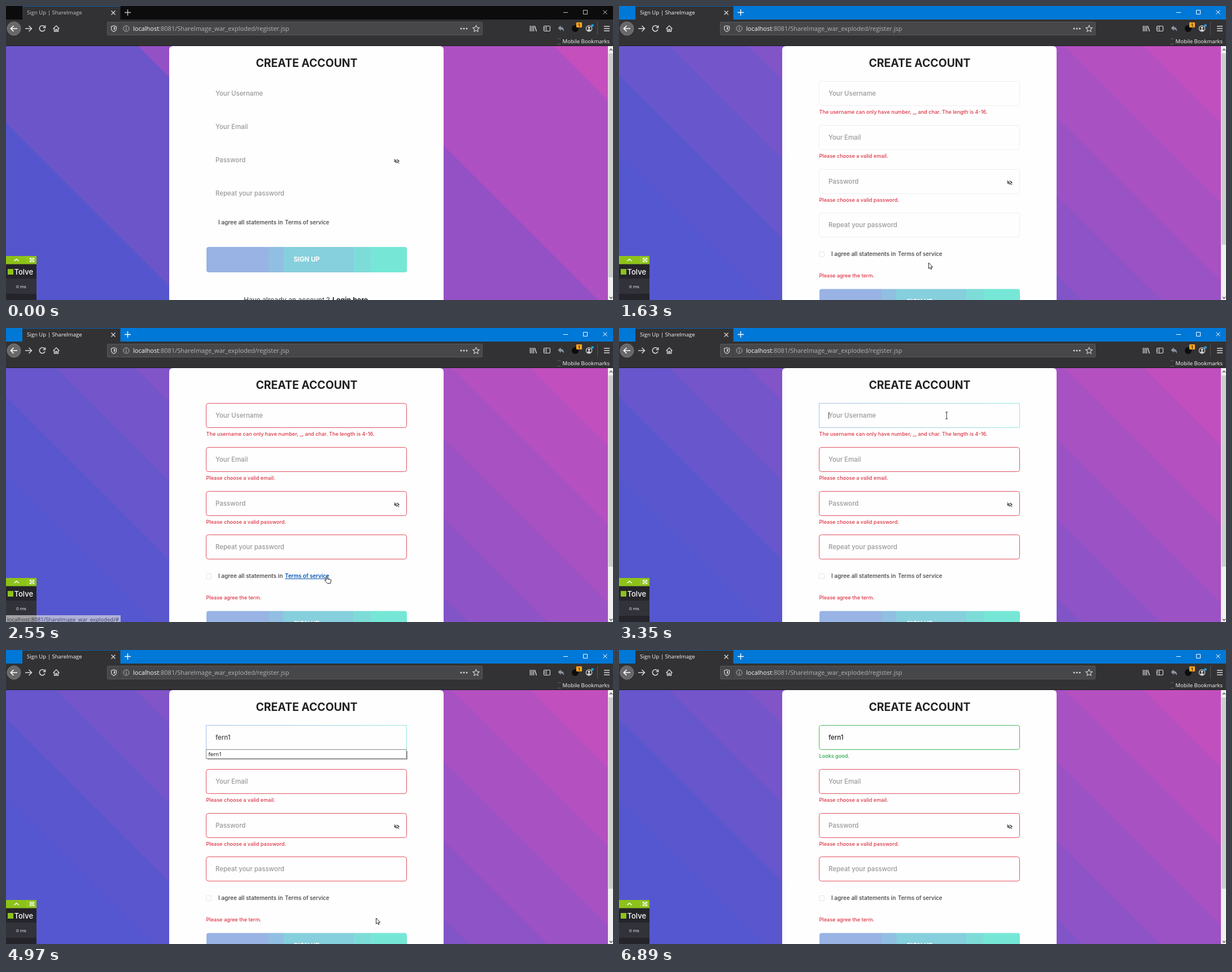
An HTML page for the animation above (6.99 s loop, 1075 by 521 pixels).

```html
<!DOCTYPE html>
<html lang="en">
<head>
<meta charset="utf-8">
<title>Sign Up</title>
<style>
html, body { margin: 0; width: 100%; height: 100%; overflow: hidden; background: #323234; }
svg { display: block; width: 1075px; height: 521px; }
text { white-space: pre; }
.form { font-family: Inter, "Noto Sans", sans-serif; }
.ui { font-family: "Open Sans", "Noto Sans", sans-serif; }
</style>
</head>
<body>
<svg id="stage" viewBox="0 0 1075 521" xmlns="http://www.w3.org/2000/svg"></svg>
<script>
const LOOP = 6990;
const RED = [220, 53, 69], GREEN = [40, 167, 69], PALE = [235, 235, 235];
const BLUE = [84, 87, 207], VIOLET = [142, 83, 198], PINK = [199, 79, 189];
const LEFT = 354.5, WIDTH = 355;
const FIELD_Y = [133.5, 211.5, 289.5, 366.5];
const LABELS = ["Your Username", "Your Email", "Password", "Repeat your password"];
const NAME = "fern1";
const KEY_TIMES = [3650, 3800, 4050, 4300, 4500];

const ramp = (t, a, b) => Math.min(1, Math.max(0, (t - a) / (b - a)));
const mix = (a, b, k) => `rgb(${a.map((v, i) => Math.round(v + (b[i] - v) * k))})`;

const rect = (x, y, w, h, fill, more = "") =>
  `<rect x="${x}" y="${y}" width="${w}" height="${h}" fill="${fill}" ${more}/>`;
const line = (d, color, w = 1, more = "") =>
  `<path d="${d}" fill="none" stroke="${color}" stroke-width="${w}" ${more}/>`;
const label = (cls, x, y, s, size, fill, weight = 400, more = "") =>
  `<text class="${cls}" x="${x}" y="${y}" font-size="${size}" fill="${fill}" font-weight="${weight}" ${more}>${s}</text>`;
const form = (...a) => label("form", ...a);
const ui = (...a) => label("ui", ...a);
const group = (id, body, more = "") => `<g id="${id}" ${more}>${body}</g>`;

function defs() {
  const bands = [[355, 465, "#98b3e4"], [465, 491, "#90bfe1"], [491, 615, "#86cfdc"],
    [615, 646, "#7edcd8"], [646, 710, "#76e7d6"]];
  const stops = bands.map(([a, b, c]) =>
    [a, b].map(x => `<stop offset="${(x - 355) / 355}" stop-color="${c}"/>`).join("")).join("");
  return `<defs>
    <linearGradient id="bands" gradientUnits="userSpaceOnUse" x1="355" y1="0" x2="710" y2="0">${stops}</linearGradient>
    <linearGradient id="focusLine" gradientUnits="userSpaceOnUse" x1="355" y1="0" x2="710" y2="0">
      <stop offset="0" stop-color="#97b3e4"/><stop offset="1" stop-color="#84e3d8"/></linearGradient>
    <clipPath id="page"><rect y="71" width="1066" height="450"/></clipPath>
  </defs>`;
}

// Everything to the upper right of the diagonal x - y = s.
const beyond = (s, color) => `<path d="M${s + 71} 71L${s + 521} 521H1600V71z" fill="${color}"/>`;

function coarseBack() {
  const bands = [[-207, "#6c55c9"], [163, "#9451c5"], [528, "#ad50c2"], [899, "#c44fbd"]];
  return rect(0, 71, 1066, 450, "#5556cd") + bands.map(b => beyond(...b)).join("");
}

function fineBack() {
  const start = -262, step = 140, count = 9;
  let out = rect(0, 71, 1066, 450, mix(BLUE, BLUE, 0));
  for (let i = 0; i < count; i++) {
    const k = (i + .5) / count * 2;
    out += beyond(start + i * step, k < 1 ? mix(BLUE, VIOLET, k) : mix(VIOLET, PINK, k - 1));
  }
  return out;
}

const card = `<path d="M289 521V78q0-7 7-7H768q7 0 7 7V521z" fill="#fefefe"/>` +
  form(532.5, 108, "CREATE ACCOUNT", 19.4, "#222", 700, 'text-anchor="middle"');

const eye = y => `<g transform="translate(692 ${y})">
  <path d="M-5 0Q0-6.4 5 0Q0 6.4-5 0z" fill="#444"/><circle r="2.1" fill="#fefefe"/><circle r="1.2" fill="#444"/>
  ${line("M-4.2-4.2L4.6 4", "#fefefe", 2.2)}${line("M-4.6-3.6L4.2 4.2", "#444", 1.1)}</g>`;

const button = y => rect(355, y, 355, 45, "url(#bands)", 'rx="4"') +
  form(532.5, y + 26, "SIGN UP", 11.4, "#fff", 700, 'text-anchor="middle"');

const terms = y => form(376, y, "I agree all statements in", 10, "#555", 600) +
  form(494, y, "Terms of service", 9.7, "#555", 600);

function firstPage() {
  return coarseBack() + card +
    LABELS.map((s, i) => form(371, 159 + i * 59.1, s, 11.4, "#999", 500)).join("") +
    eye(275) + terms(387) + button(427) +
    form(421, 525, "Have already an account ?", 12.1, "#555", 500) +
    form(578, 525, "Login here", 12.3, "#222", 700);
}

function secondPage() {
  const note = (y, s) => form(354.5, y, s, 9.1, "#dc3545", 500);
  return fineBack() + card +
    FIELD_Y.map((y, i) => rect(LEFT, y, WIDTH, 43, "#fefefe", `class="field" rx="4" stroke-width=".85"`) +
      form(371, y + 25.5, LABELS[i], 11.4, "#999", 500, `id="hint${i}"`)).join("") +
    eye(313) +
    form(354.5, 190.5, "", 9.1, "#dc3545", 500, 'id="nameNote"') +
    note(268.5, "Please choose a valid email.") +
    note(346.5, "Please choose a valid password.") +
    note(481, "Please agree the term.") +
    rect(354.5, 435.5, 9, 9, "#fefefe", 'rx="1.5" stroke="#e6e6e6"') +
    terms(443) +
    group("link", rect(493, 433, 80, 13, "#fefefe") +
      form(494, 443, "Terms of service", 9.7, "#0056b3", 600, 'text-decoration="underline"')) +
    button(501.5) +
    form(371, 159, "", 11.4, "#444", 500, 'id="typed"') +
    line("M0 149V161", "#444", 1, 'id="caret"') +
    group("menu", rect(357, 179, 354, 15, "#999") +
      rect(354.5, 176.5, 354.5, 16, "#fff", 'stroke="#888"') + ui(358.5, 188, NAME, 9.6, "#000", 500));
}

function chrome() {
  const ink = "#d8d8da";
  const tab = rect(29, 0, 173.5, 25, "#323234") + rect(29, 0, 173.5, 1, "#0a64b4") +
    ui(37, 15, "Sign Up | ShareImage", 9.6, "#ddd", 400, 'id="tabName"') +
    line("M186.5 8.5l7 7m0-7l-7 7", "#ddd", 1.2);
  const controls = group("controls", line("M210 11.5h11m-5.5-5.5v11", "#fff", 1.4) +
    line("M987 11.5h8M1022.5 7.5h7v7h-7zM1057.5 7.5l7 7m0-7l-7 7", "#fff", 1));
  const nav = `<circle cx="14" cy="40" r="12" fill="#68686b" stroke="#858588" stroke-width=".8"/>` +
    line("M20 40H8.5m5-5l-5 5l5 5", "#fff", 1.7) +
    line("M34 40h11.5m-5-5l5 5l-5 5", ink, 1.5) +
    line("M68.5 37a5 5 0 1 0 .5 4.5M69.5 34.5v4h-4", ink, 1.6) +
    line("M83.5 40.5l5.5-5.5l5.5 5.5M85.5 39.5v5.5h2.5v-3.5h2v3.5h2.5v-5.5", ink, 1.4);
  const bar = rect(179.5, 28.5, 664, 23, "#474749", 'rx="1" stroke="#59595c"') +
    rect(201, 29, 1, 22, "#3d3d40") +
    line("M191 35l4.5 1.5v3q0 4-4.5 6q-4.5-2-4.5-6v-3z", ink, 1.2) +
    `<path d="M191 37v6q2.5-1.5 2.5-5z" fill="${ink}"/>` +
    `<circle cx="213" cy="40" r="5" fill="none" stroke="#b5b5b7"/>` +
    line("M213 37v1.5m0 1v3.5", "#b5b5b7", 1.2) +
    ui(225, 44, `<tspan fill="#f9f9fa">localhost</tspan>:8081/ShareImage_war_exploded/register.jsp`, 11, "#b4b4b6") +
    [806, 811, 816].map(x => `<circle cx="${x}" cy="40" r="1.5" fill="${ink}"/>`).join("") +
    line("M832.5 34.5l1.7 3.6l4 .5l-3 2.7l.8 3.9l-3.5-1.9l-3.5 1.9l.8-3.9l-3-2.7l4-.5z", ink, 1.1);
  const tools = line("M928.5 35v10M931.5 35v10M934.5 35v10M936.5 35.5l3 9.5", ink, 1.4) +
    rect(952.5, 35.5, 11, 9, "none", `rx="1.5" stroke="${ink}" stroke-width="1.2"`) +
    line("M957 36v8.5M953.5 38.5h2m-2 2.5h2", ink) +
    `<path d="M977.5 39l5-4.5v2.8q6 0 5.5 8q-1.5-4-5.5-4v2.7z" fill="#8c96a3"/>` +
    `<circle cx="1008" cy="40" r="6" fill="#0c0c0d"/>` +
    rect(1010, 29, 10, 9, "#ffa51f", 'rx="1"') +
    ui(1015, 36.7, "1", 8, "#111", 600, 'text-anchor="middle"') +
    `<circle cx="1032.5" cy="40" r="5.2" fill="none" stroke="${ink}" stroke-width="1.2"/>
     <circle cx="1032.5" cy="38.5" r="2" fill="${ink}"/><path d="M1029 43q3.5-4 7 0q-3.5 3-7 0z" fill="${ink}"/>
     <circle cx="1038.5" cy="34.5" r="2.3" fill="#19a7f0"/>` +
    rect(1047, 28, 1, 23, "#55565a") +
    line("M1059 36h10m-10 4h10m-10 4h10", ink, 1.5) +
    line("M977 58h6M977 67.5h6", "#77777a", 1, 'stroke-dasharray="2 1"') +
    ui(985.5, 65.7, "Mobile Bookmarks", 9.6, "#f9f9fa");
  return rect(0, 0, 1075, 25, "#0078d7", 'id="titleBar"') + rect(0, 24, 1075, 47, "#323234") +
    tab + controls + nav + bar + tools + rect(0, 70, 1075, 1, "#1c1c1e");
}

const scrollBar = rect(1066, 71, 9, 450, "#f0f0f0") +
  rect(1067, 84, 8, 340, "#cdcdcd", 'id="thumb"') +
  line("M1069 79l2.5-3l2.5 3M1069 515.5l2.5 3l2.5-3", "#555", 1.3);

const badge = rect(0, 443, 54, 15, "#8dc21a") + rect(37.5, 443, 1, 15, "#a4d043") +
  line("M14.5 452l4-3.5l4 3.5", "#fff", 1.6) +
  line("M42.5 446.5l7 7m0-7l-7 7M42.5 449.5v-3h3M46.5 446.5h3v3M49.5 450.5v3h-3M45.5 453.5h-3v-3", "#fff", 1.2) +
  rect(0, 457.5, 54, 64, "#24242a") + rect(0, 483, 54, 27, "#32323a") +
  rect(3, 466, 10, 10, "#8dc21a") + form(14.5, 476, "Tolve", 13, "#fff", 500) +
  ui(18, 499.5, "0 ms", 8, "#fff");

const status = group("status", rect(0, 509, 203, 12, "#d7d7db") +
  ui(2, 520, "localhost:8081/ShareImage_war_exploded/#", 9.6, "#38383d"));

const cursor = group("cursor",
  `<path id="arrow" d="M0 0V10.5L2.4 8.3L4 11.7L5.5 11L4 7.7H7.2z" fill="#fff" stroke="#111" stroke-width=".9"/>
   <path id="hand" d="M0 1Q1-.5 2 1V5.5L7.5 6.7Q9 7 8.7 9L7.5 13.5H2L-1.8 9.5Q-3 7.5-1.5 7L0 8.2z" fill="#fff" stroke="#111" stroke-width=".9"/>
   <path id="beam" d="M-2-6h4M0-6V6M-2 6h4" fill="none" stroke="#333"/>`);

document.getElementById("stage").innerHTML = defs() +
  `<g clip-path="url(#page)">${group("first", firstPage())}${group("second", secondPage())}</g>` +
  chrome() + scrollBar + badge + status + cursor;

const el = id => document.getElementById(id);
const set = (id, name, value) => el(id).setAttribute(name, value);
const show = (id, on) => set(id, "visibility", on ? "visible" : "hidden");
const fields = [...document.querySelectorAll(".field")];

// Pointer stops: time, x, y of the hot spot.
const PATH = [
  [100, 836, 357], [350, 730, 118], [740, 593, 300], [960, 604, 425], [1200, 550, 457], [1530, 550, 457],
  [1630, 548.5, 455], [2250, 548.5, 455], [2450, 567, 439], [2700, 567, 439], [3200, 560, 160], [3500, 600, 150],
  [3850, 689, 278], [4400, 689, 285], [4870, 668, 428], [4970, 655.5, 475], [5150, 785, 492], [5300, 785, 492],
  [5570, 594, 507], [5900, 574, 507], [6290, 594, 507], [6390, 594, 507], [6600, 780, 487], [6840, 984, 512]
];

function pointer(t) {
  const i = Math.max(1, PATH.findIndex(p => p[0] > t));
  const [a, x, y] = PATH[i - 1], [b, x2, y2] = PATH[i];
  const k = ramp(t, a, b), e = k * k * (3 - 2 * k);
  return [x + (x2 - x) * e, y + (y2 - y) * e];
}

function drawPointer(t) {
  const on = t >= 100 && t < 6840;
  set("cursor", "display", on ? "inline" : "none");
  if (!on) return;
  const [x, y] = pointer(t);
  const inForm = x > 355 && x < 710;
  const later = t >= 1630;
  const overLink = later && t < 3000 && x > 494 && x < 573 && y > 433 && y < 447;
  const overButton = inForm && (later ? y > 501 : y > 427 && y < 472);
  const overField = later && inForm && FIELD_Y.some(f => y > f && y < f + 43);
  const shape = overLink || overButton ? "hand" : overField ? "beam" : "arrow";
  for (const id of ["arrow", "hand", "beam"]) show(id, id === shape);
  set("cursor", "transform", `translate(${x.toFixed(1)} ${y.toFixed(1)})`);
}

function draw(t) {
  const active = t >= 1530, checked = t >= 1630;
  const focused = t >= 3350 && t < 5200, valid = t >= 5200;

  set("titleBar", "fill", active ? "#0078d7" : "#0c0c0d");
  set("controls", "opacity", active ? 1 : .75);
  set("tabName", "fill", active ? "#f9f9fa" : "#c4c4c6");
  set("first", "display", checked ? "none" : "inline");
  set("second", "display", checked ? "inline" : "none");
  set("thumb", "height", checked ? 339 : 397);

  const bad = mix(PALE, RED, ramp(t, 1680, 2080));
  fields.forEach(f => f.setAttribute("stroke", bad));
  if (focused) fields[0].setAttribute("stroke", "url(#focusLine)");
  if (valid) fields[0].setAttribute("stroke", mix(PALE, GREEN, ramp(t, 5200, 5550)));
  fields[0].setAttribute("rx", focused ? 0 : 4);

  const count = KEY_TIMES.filter(k => t >= k).length;
  el("typed").textContent = NAME.slice(0, count);
  set("typed", "fill", valid ? "#222" : "#444");
  set("hint0", "display", count ? "none" : "inline");
  show("caret", focused && t < 4900);
  set("caret", "transform", `translate(${371.5 + (count ? el("typed").getComputedTextLength() : 0)} 0)`);
  set("menu", "display", count && !valid ? "inline" : "none");
  el("nameNote").textContent = valid ? "Looks good."
    : "The username can only have number, _, and char. The length is 4-16.";
  set("nameNote", "fill", valid ? "#28a745" : "#dc3545");

  show("link", t >= 2350 && t < 2800);
  set("status", "opacity", .7 * ramp(t, 2430, 2540) + .3 * ramp(t, 2580, 2650) - ramp(t, 2800, 2900));
  drawPointer(t);
}

function tick(now) {
  draw(now % LOOP);
  requestAnimationFrame(tick);
}
draw(0);
requestAnimationFrame(tick);
</script>
</body>
</html>
```
